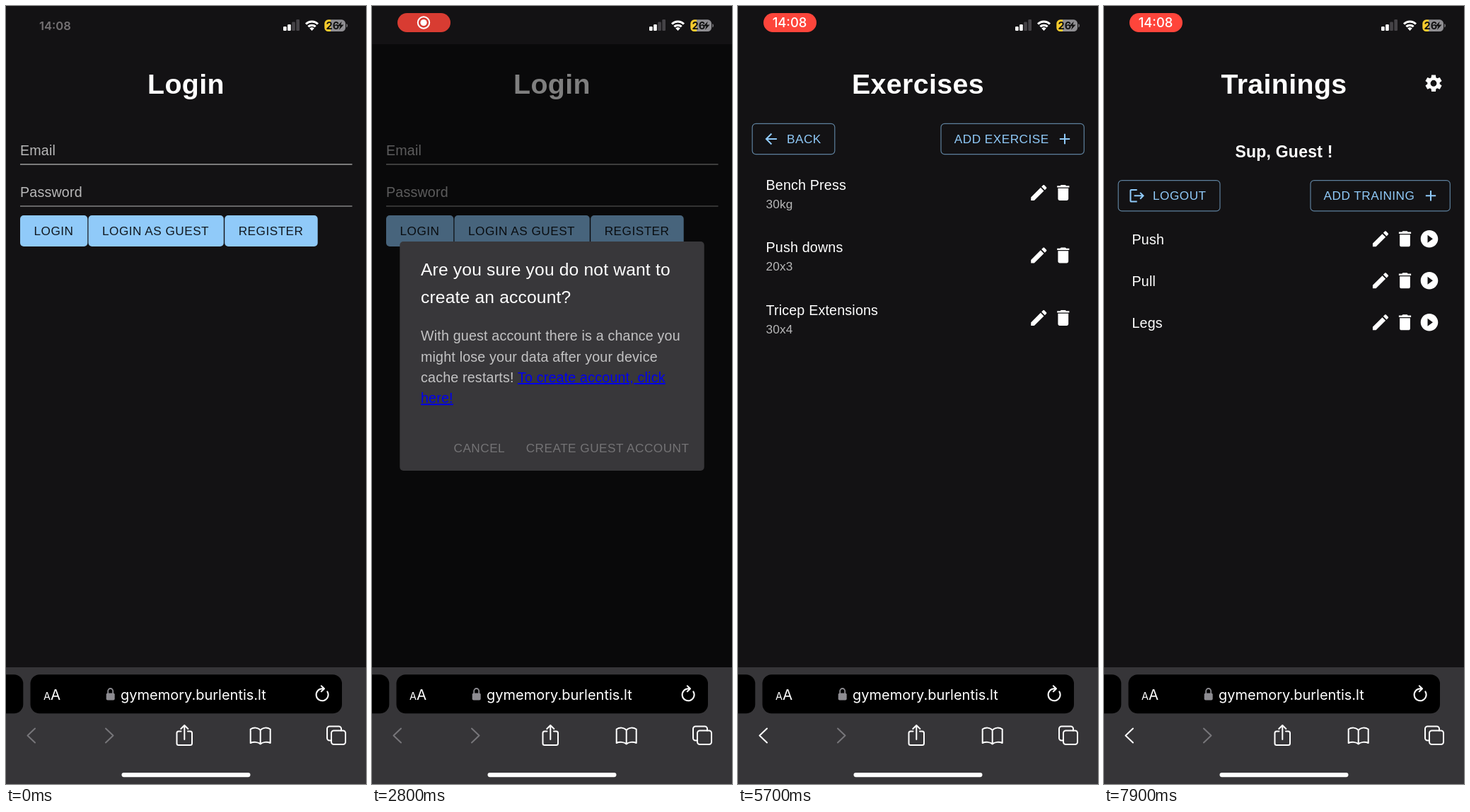
Write an HTML page that moves like this. It is 509x1100 px and loops after 8000 ms.

```html
<!DOCTYPE html>
<html lang="en">
<head>
<meta charset="utf-8">
<title>Training log</title>
<style>
html, body { margin: 0; width: 100%; height: 100%; overflow: hidden; background: #131214; }
svg { display: block; width: 100vw; height: 100vh; }
text { font: 19.67px "Liberation Sans", Arial, sans-serif; letter-spacing: .00938em; fill: #fff; white-space: pre; }
.h1 { font-size: 39.34px; font-weight: 700; text-anchor: middle; }
.h3 { font-size: 23px; font-weight: 700; text-anchor: middle; }
.h6 { font-size: 24.59px; letter-spacing: .0075em; }
.btn { font-size: 17.21px; letter-spacing: .02857em; fill: #90caf9; }
.dark { fill: #111820; }
.soft { fill: rgba(255,255,255,.7); }
.small { font-size: 17.21px; }
.label { font-size: 14.75px; }
.link { fill: #00e; text-decoration: underline; }
.ui { font-family: Inter, Roboto, sans-serif; letter-spacing: 0; }
.line { stroke: rgba(255,255,255,.7); stroke-width: 1.2; }
.edge { fill: none; stroke: rgba(144,202,249,.6); stroke-width: 1.2; }
.off .btn { fill: rgba(255,255,255,.3); }
.pen { fill: none; stroke: #fff; stroke-width: 2; stroke-linecap: round; stroke-linejoin: round; }
</style>
</head>
<body>
<svg id="stage" viewBox="0 0 509 1100" preserveAspectRatio="none"></svg>
<script>
const LOOP = 8000;
const ICONS = {
  edit: "M3 17.25V21h3.75L17.81 9.94l-3.75-3.75L3 17.25zM20.71 7.04c.39-.39.39-1.02 0-1.41l-2.34-2.34c-.39-.39-1.02-.39-1.41 0l-1.83 1.83 3.75 3.75 1.83-1.83z",
  bin: "M6 19c0 1.1.9 2 2 2h8c1.1 0 2-.9 2-2V7H6v12zM19 4h-3.5l-1-1h-5l-1 1H5v2h14V4z",
  play: "M12 2C6.48 2 2 6.48 2 12s4.48 10 10 10 10-4.48 10-10S17.52 2 12 2zm-2 14.5v-9l6 4.5-6 4.5z",
  exit: "M17 7l-1.41 1.41L18.17 11H8v2h10.17l-2.58 2.58L17 17l5-5zM4 5h8V3H4c-1.1 0-2 .9-2 2v14c0 1.1.9 2 2 2h8v-2H4V5z",
  add: "M19 13h-6v6h-2v-6H5v-2h6V5h2v6h6v2z",
  back: "M20 11H7.83l5.59-5.59L12 4l-8 8 8 8 1.41-1.41L7.83 13H20v-2z",
  gear: gearPath()
};

function gearPath() {
  const pts = [];
  for (let i = 0; i < 6; i++) {
    for (const [off, r] of [[-23, 7.1], [-14, 9.8], [14, 9.8], [23, 7.1]]) {
      const a = (i * 60 - 90 + off) * Math.PI / 180;
      pts.push((12 + r * Math.cos(a)).toFixed(2) + " " + (12 + r * Math.sin(a)).toFixed(2));
    }
  }
  return `M${pts.join("L")}ZM12 8.4a3.6 3.6 0 1 0 0 7.2a3.6 3.6 0 1 0 0-7.2z`;
}

const text = (x, y, s, cls = "") => `<text x="${x}" y="${y}" class="${cls}">${s}</text>`;
const rect = (x, y, w, h, r, fill, extra = "") =>
  `<rect x="${x}" y="${y}" width="${w}" height="${h}" rx="${r}" fill="${fill}" ${extra}/>`;
const icon = (name, cx, cy, k = 1.2295, fill = "#fff") =>
  `<path d="${ICONS[name]}" fill="${fill}" fill-rule="evenodd" transform="translate(${cx} ${cy}) scale(${k}) translate(-12 -12)"/>`;
const line = (x1, x2, y) => `<path class="line" d="M${x1} ${y}H${x2}"/>`;
const group = (id, body) => `<g id="${id}">${body}</g>`;
const solid = (x, w, s) => rect(x, 296, w, 44, 5, "#90caf9") + text(x + 19.5, 324, s, "btn dark");
const outlined = (x, y, w, tx, s, name, ix) =>
  rect(x, y, w, 43.2, 5, "none", 'class="edge"') + text(tx, y + 27.6, s, "btn") +
  icon(name, ix, y + 21.6, 1.025, "#90caf9");

const training = (s, i) => {
  const y = 329.3 + i * 59;
  return text(39.5, y + 7.5, s) + icon("edit", 391, y) + icon("bin", 425.5, y) + icon("play", 460, y);
};
const exercise = ([name, count], i) => {
  const y = 264 + i * 88.5;
  return text(39.5, y - 4.5, name) + text(39.5, y + 21.5, count, "soft small") +
    icon("edit", 425.3, y) + icon("bin", 459.8, y);
};
const field = (y, label, value) =>
  text(80, y, label, "soft label") + text(80, y + 32.3, value) + line(80, 429, y + 44.5);

const login = text(254.5, 124, "Login", "h1") +
  text(20, 211.3, "Email", "soft") + line(20, 489.5, 223.8) +
  text(20, 270.4, "Password", "soft") + line(20, 489.5, 283) +
  solid(20, 95.3, "LOGIN") + solid(116.5, 191.3, "LOGIN AS GUEST") + solid(309.2, 131.5, "REGISTER") +
  `<circle id="tapGuest" cx="187" cy="318" clip-path="url(#guestBox)"/>`;

const trainings = text(254.5, 124, "Trainings", "h1") + icon("gear", 466, 109.3) +
  text(254.5, 213.6, "Sup, Guest !", "h3") +
  outlined(20.2, 246.7, 143.8, 69, "LOGOUT", "exit", 46.7) +
  outlined(292, 246.7, 197.3, 310.6, "ADD TRAINING", "add", 462) +
  ["Push", "Pull", "Legs"].map(training).join("");

const exercises = text(254.5, 124, "Exercises", "h1") +
  outlined(20.2, 166.4, 116.6, 69, "BACK", "back", 46.7) +
  outlined(287, 166.4, 202.3, 305.8, "ADD EXERCISE", "add", 462) +
  `<circle id="tapRow" cx="80" cy="264" fill="#fff" clip-path="url(#rowBox)"/>` +
  [["Bench Press", "30kg"], ["Push downs", "20x3"], ["Tricep Extensions", "30x4"]].map(exercise).join("");

const guestDialog = rect(39.3, 333, 430.4, 324, 5, "#38373a") +
  text(69, 381, "Are you sure you do not want to", "h6") +
  text(69, 420, "create an account?", "h6") +
  text(69, 473, "With guest account there is a chance you", "soft") +
  text(69, 502.5, "might lose your data after your device", "soft") +
  text(69, 532, `cache restarts! <tspan class="link">To create account, click</tspan>`, "soft") +
  text(69, 561.3, "here!", "link") +
  text(115.5, 631, "CANCEL", "btn") + text(217.7, 631, "CREATE GUEST ACCOUNT", "btn");

const editDialog = rect(50.8, 337.5, 408, 314.5, 5, "#38373a") +
  text(80, 386, "Edit Exercise", "h6") +
  field(440, "Exercise Name", "Bench Press") + field(513.7, "Exercise Count", "30kg") +
  text(168.5, 626, "CANCEL", "btn") + text(271, 626, "UPDATE EXERCISE", "btn");

const signal = [6, 9, 12.5, 16].map((h, i) =>
  rect(392 + i * 6.1, 35 - h, 4.7, h, 1.3, i < 2 ? "#fff" : "#454347")).join("");

const status = rect(0, 0, 509, 54, 0, "#131214") +
  `<text id="clock" x="47" y="34" class="ui" style="font-size:16.6px;font-weight:600;fill:#757274">14:08</text>` +
  group("pill", rect(36, 10, 75, 27, 13.5, "#e93e33", 'id="pillBox"') +
    group("rec", `<circle cx="73" cy="23.5" r="8.2" class="pen"/><circle cx="73" cy="23.5" r="4.6" fill="#fff"/>`) +
    `<text id="pillTime" x="73" y="30.2" class="ui" text-anchor="middle" style="font-size:18.4px;font-weight:500">14:08</text>`) +
  signal +
  `<path d="M424 25.5a12.3 12.3 0 0 1 17 0M427.3 29.2a7.6 7.6 0 0 1 10.4 0" fill="none" stroke="#fff" stroke-width="3"/>
   <path d="M432.5 35l-3.3-3.4a4.8 4.8 0 0 1 6.6 0z" fill="#fff"/>
   <path d="M456 19.3h-.3a5.4 5.4 0 0 0-5.4 5.4v6a5.4 5.4 0 0 0 5.4 5.4H459V19.3z" fill="#f7cb2d"/>
   <path d="M459 19.3h15.6a5.4 5.4 0 0 1 5.4 5.4v6a5.4 5.4 0 0 1-5.4 5.4H459z" fill="#8f8e92"/>
   <path d="M481.3 25c2 1 2 4.400 0 5.400z" fill="#8f8e92"/>
   <path d="M474.8 21.800l-6.300 6.800h4l-1.500 5.200 6.500-7.200h-4.100z" fill="#111"/>` +
  `<text x="452.5" y="33.2" class="ui" style="font-size:14.6px;font-weight:700;fill:#111">26</text>`;

const toolbar = rect(0, 935, 509, 165, 0, "#363538") +
  rect(-30, 945.3, 54.3, 55, 13, "#000") + rect(34.5, 945.3, 440.5, 55, 13, "#000") +
  `<text x="53" y="980.5" class="ui" style="font-size:14.500px">A</text>
   <text x="63" y="980.5" class="ui" style="font-size:20.500px">A</text>
   <text x="162" y="980.5" class="ui" style="font-size:20px">gymemory.burlentis.lt</text>` +
  rect(141.7, 971.5, 12, 10, 2, "#8d8c91") +
  `<path d="M144.200 972v-3.500a3.500 3.500 0 0 1 7 0v3.500" fill="none" stroke="#8d8c91" stroke-width="1.800"/>
   <g class="pen" stroke-width="2">
   <path d="M454.300 969.300a8.500 8.500 0 1 1-7-4h2M445.800 961.300l4.200 4-4.200 4"/>
   <path id="prev" d="M41 1021.500l-10.500 10 10.500 10"/>
   <path d="M141 1021.500l10.500 10-10.500 10" style="stroke:#77767a"/>
   <path d="M247.500 1025.500h-3.500a2.500 2.500 0 0 0-2.500 2.500v14.500a2.500 2.500 0 0 0 2.500 2.500h16.500a2.500 2.500 0 0 0 2.500-2.500V1028a2.500 2.500 0 0 0-2.500-2.500H257M252.300 1037v-19.500M247.300 1022l5-5 5 5"/>
   <path d="M359.700 1024v19.500c-3-3-9.500-3.500-14-1.500v-19.500c4.500-3 11-2.500 14 1.500c3-4 9.500-4.500 14-1.500v19.500c-4.500-2-11-1.500-14 1.500"/>
   <path d="M460 1038.500h-2.500a3.500 3.500 0 0 1-3.500-3.500v-13a3.500 3.500 0 0 1 3.500-3.500h13a3.500 3.500 0 0 1 3.500 3.500v2.500"/>
   <rect x="460" y="1024.500" width="20" height="19.500" rx="3.500"/></g>` +
  rect(163.5, 1084, 182, 6.2, 3.1, "#fff");

document.getElementById("stage").innerHTML =
  `<defs><clipPath id="guestBox">${rect(116.5, 296, 191.3, 44, 5, "#000")}</clipPath>
   <clipPath id="rowBox">${rect(19.7, 220, 470, 88, 0, "#000")}</clipPath></defs>` +
  rect(0, 0, 509, 1100, 0, "#131214") +
  group("login", login) + group("trainings", trainings) + group("exercises", exercises) +
  rect(0, 54, 509, 881, 0, "#000", 'id="dim"') +
  group("guestDialog", guestDialog) + group("editDialog", editDialog) +
  status + toolbar;

const el = id => document.getElementById(id);
const clamp = v => Math.min(1, Math.max(0, v));
const span = (t, from, len) => clamp((t - from) / len);
const show = (id, on) => el(id).style.display = on ? "" : "none";
const fade = (id, a) => { el(id).style.opacity = a; show(id, a > 0); };

// cubic-bezier(.4, 0, .2, 1)
function ease(x) {
  let lo = 0, hi = 1;
  for (let i = 0; i < 24; i++) {
    const u = (lo + hi) / 2, v = 1 - u;
    if (1.2 * v * v * u + .6 * v * u * u + u * u * u < x) lo = u; else hi = u;
  }
  return 3 * (1 - lo) * lo * lo + lo * lo * lo;
}

function ripple(id, t, start, radius, release) {
  const p = ease(span(t, start, 550));
  el(id).setAttribute("r", radius * p);
  fade(id, t < start ? 0 : (.1 + .2 * p) * (1 - ease(span(t, release, 550))));
}

function draw(t) {
  const guestIn = t < 3300 ? ease(span(t, 1400, 225)) : 0;
  const editIn = ease(span(t, 6510, 225)) * (1 - ease(span(t, 7350, 195)));
  const inExercises = t >= 5600 && t < 7750;

  show("login", t < 3300);
  show("exercises", inExercises);
  show("trainings", t >= 3300 && !inExercises);
  ripple("tapGuest", t, 1400, 140, 1620);
  ripple("tapRow", t, 6500, 410, 6620);

  fade("dim", .5 * Math.max(guestIn, editIn));
  fade("guestDialog", guestIn);
  fade("editDialog", editIn);
  const sent = t >= 2780;
  el("guestDialog").setAttribute("transform", `translate(0 ${sent ? 0 : 19})`);
  el("guestDialog").setAttribute("class", sent ? "off" : "");

  const glow = .5 + .5 * Math.cos((t - 1850) / 2000 * 2 * Math.PI);
  const mix = (a, b) => Math.round(a + (b - a) * glow);
  el("pillBox").setAttribute("fill", `rgb(${mix(216, 255)},${mix(60, 69)},${mix(50, 59)})`);
  fade("clock", 1 - span(t, 0, 200));
  fade("pill", span(t, 100, 300));
  const swap = span(t, 3500, 300);
  fade("rec", 1 - swap);
  fade("pillTime", swap);
  el("prev").style.stroke = t < 3300 ? "#77767a" : "#fff";
}

const began = performance.now();
function tick() {
  draw((performance.now() - began) % LOOP);
  requestAnimationFrame(tick);
}
tick();
</script>
</body>
</html>
```
